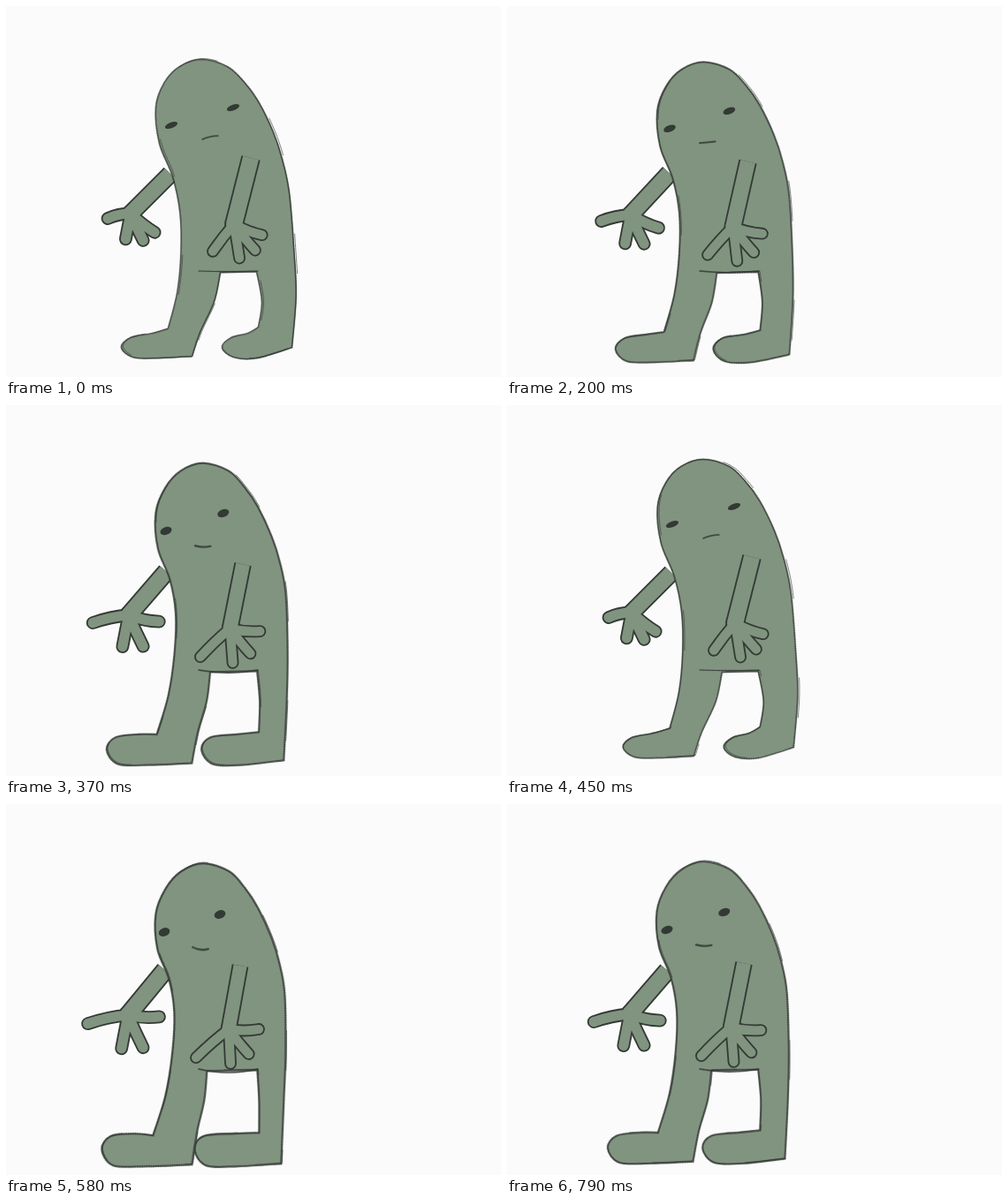
An HTML page with a canvas for the animation above (0.83 s loop, 560x420 px).

```html
<!DOCTYPE html>
<html lang="en">
<head>
<meta charset="utf-8">
<title>Green walker</title>
<style>
html, body { margin: 0; width: 100%; height: 100%; overflow: hidden; background: #fbfbfb; }
canvas { display: block; }
</style>
</head>
<body>
<canvas id="stage" width="560" height="420"></canvas>
<script>
const ctx = document.getElementById('stage').getContext('2d');
const PAPER = '#fbfbfb', SKIN = '#80947f', INK = '#333934';
const LOOP = 830, FPS = 24;

// How far the figure is drawn up at each step: 0 is slumped, 1 is tall.
const keys = [[0, 1], [3, .25], [7, 1], [9, .25], [11, 1], [14, 0], [17, .12], [19, .25], [20, 1]];

// Slumped silhouette, from the left ankle over the head and down the back.
const silhouette = [
  [166, 375], [180, 330], [188, 280], [190, 235], [184, 198], [171, 164], [169, 125], [180, 96], [198, 76],
  [223, 67], [252, 76], [270, 95], [285, 118], [300, 151], [309, 180], [315, 215], [316, 280], [314, 335]
];

const lerp = (a, b, k) => a + (b - a) * k;
const noise = n => { const s = Math.sin(n * 91.7) * 4375.5; return s - Math.floor(s) - .5; };

function heightAt(step) {
  const i = keys.findIndex((key, n) => step < keys[n + 1][0]);
  const [s0, k0] = keys[i], [s1, k1] = keys[i + 1];
  return lerp(k0, k1, (step - s0) / (s1 - s0));
}

// Standing up swings the lower body back and lifts the face and the feet.
const sway = ([x, y], k) => [
  x + k * (23 * (y / 400) ** 1.5 - 3),
  y - k * 5 * (1 + Math.cos((y - 125) / 43))
];

// Continues the path with a smooth Catmull-Rom run; runs meet in corners.
function run(path, pts) {
  const at = i => pts[Math.max(0, Math.min(pts.length - 1, i))];
  for (let i = 0; i < pts.length - 1; i++) {
    const [p, a, b, q] = [at(i - 1), at(i), at(i + 1), at(i + 2)];
    path.bezierCurveTo(a[0] + (b[0] - p[0]) / 6, a[1] + (b[1] - p[1]) / 6,
      b[0] - (q[0] - a[0]) / 6, b[1] - (q[1] - a[1]) / 6, ...b);
  }
}

function foot(heel, toe, ankle, k) {
  const sole = lerp(409, 398, k);
  return [heel, [(heel[0] + toe) / 2, sole + 1], [toe + 13, sole], [toe, lerp(391, 387, k)],
    [toe + 10, 376], [(toe + ankle[0]) / 2 + 8, lerp(373, 371, k)], ankle];
}

function bodyPath(k) {
  const path = new Path2D();
  const side = silhouette.map(p => sway(p, k));
  const backHeel = [lerp(311, 324, k), lerp(407, 387, k)];
  const frontHeel = [lerp(210, 211, k), lerp(408, 397, k)];
  const ankle = [286, lerp(372, 364, k)];
  const hips = [[284, 301], [lerp(227, 243, k), 302]];
  path.moveTo(...side[0]);
  run(path, [...side, backHeel]);
  run(path, foot(backHeel, lerp(213, 245, k), ankle, k));
  run(path, [ankle, [lerp(286, 290, k), 335], hips[0]]);
  path.lineTo(...hips[1]);
  run(path, [hips[1], [lerp(224, 236, k), 335], [lerp(216, 220, k), 370], frontHeel]);
  run(path, foot(frontHeel, lerp(108, 131, k), side[0], k));
  path.closePath();
  return path;
}

const stroke = (path, width, color) => {
  ctx.strokeStyle = color;
  ctx.lineWidth = width;
  ctx.stroke(path);
};

function line(x0, y0, x1, y1, bend = 0) {
  const path = new Path2D();
  path.moveTo(x0, y0);
  path.quadraticCurveTo((x0 + x1) / 2, (y0 + y1) / 2 + bend, x1, y1);
  return path;
}

function pencil(path, width) {
  ctx.globalAlpha = .8;
  stroke(path, width, INK);
  ctx.globalAlpha = .4;
  ctx.lineCap = 'butt';
  ctx.setLineDash([1, 1]);
  stroke(path, width * 1.6, INK);
  ctx.setLineDash([]);
  ctx.lineCap = 'round';
  ctx.globalAlpha = 1;
}

// An arm with a fan of fingers, outlined as one shape and open at the shoulder.
function arm({ shoulder, palm, width, finger, fan }) {
  const limb = line(...shoulder, ...palm);
  const fingers = fan.map(([deg, reach]) => {
    const a = deg * Math.PI / 180, r = reach - finger / 2;
    return line(...palm, palm[0] + r * Math.cos(a), palm[1] + r * Math.sin(a), Math.cos(a) * 3);
  });
  for (const [grow, color] of [[1.8, INK], [-1.8, SKIN]]) {
    ctx.lineCap = 'butt';
    stroke(limb, width + grow, color);
    ctx.lineCap = 'round';
    stroke(line(...palm, ...palm), width + grow, color);
    for (const f of fingers) stroke(f, finger + grow, color);
  }
}

function eye(x, y, k) {
  ctx.fillStyle = INK;
  ctx.beginPath();
  ctx.ellipse(x, y, lerp(6.5, 7.5, k), lerp(4.6, 3.2, k), -.36, 0, 7);
  ctx.fill();
}

function draw(step) {
  const k = heightAt(step), mix = (a, b) => lerp(a, b, k);
  const width = mix(2, 1.5), body = bodyPath(k);
  ctx.fillStyle = PAPER;
  ctx.fillRect(0, 0, 560, 420);
  ctx.lineCap = ctx.lineJoin = 'round';

  arm({
    shoulder: [mix(180, 186), mix(188, 190)], palm: [mix(138, 141), mix(239, 235)],
    width: mix(20, 19), finger: 13,
    fan: [[168, mix(53, 33)], [101, mix(45, 36)], [65, mix(47, 40)], [mix(3, 38), mix(42, 41)]]
  });

  ctx.fillStyle = SKIN;
  ctx.fill(body);
  ctx.save();
  ctx.translate(noise(step), noise(step + 7));
  pencil(body, width);
  // Loose second strokes along the outline.
  ctx.translate(mix(1, 2), -1);
  ctx.setLineDash([45, 90]);
  ctx.lineDashOffset = noise(step + 3) * 135;
  ctx.globalAlpha = .6;
  stroke(body, 1, INK);
  ctx.restore();

  arm({
    shoulder: [mix(265, 277), mix(183, 172)], palm: [mix(252, 258), mix(255, 247)],
    width: mix(17, 20), finger: 12,
    fan: [[mix(139, 128), mix(55, 45)], [mix(87, 81), 45], [51, mix(42, 44)], [mix(0, 21), 40]]
  });
  pencil(line(218, 300, 285, 300, mix(8, 1)), width * .8);

  eye(mix(179, 187), mix(145, 135), k);
  eye(mix(242, 257), mix(125, 115), k);
  const x = mix(220, 231), y = mix(163, 149), tilt = mix(1, -2);
  pencil(line(x - 9, y - tilt, x + 9, y + tilt, mix(4, -2)), width);
}

// 24 steps a second, each starting on a whole hundredth.
const stepAt = ms => Math.ceil((Math.floor(ms / 10) + 1) * FPS / 100) - 1;

let shown = -1;
const start = performance.now();
function tick() {
  const step = Math.min(19, stepAt((performance.now() - start) % LOOP));
  if (step !== shown) draw(shown = step);
  requestAnimationFrame(tick);
}
tick();
</script>
</body>
</html>
```
